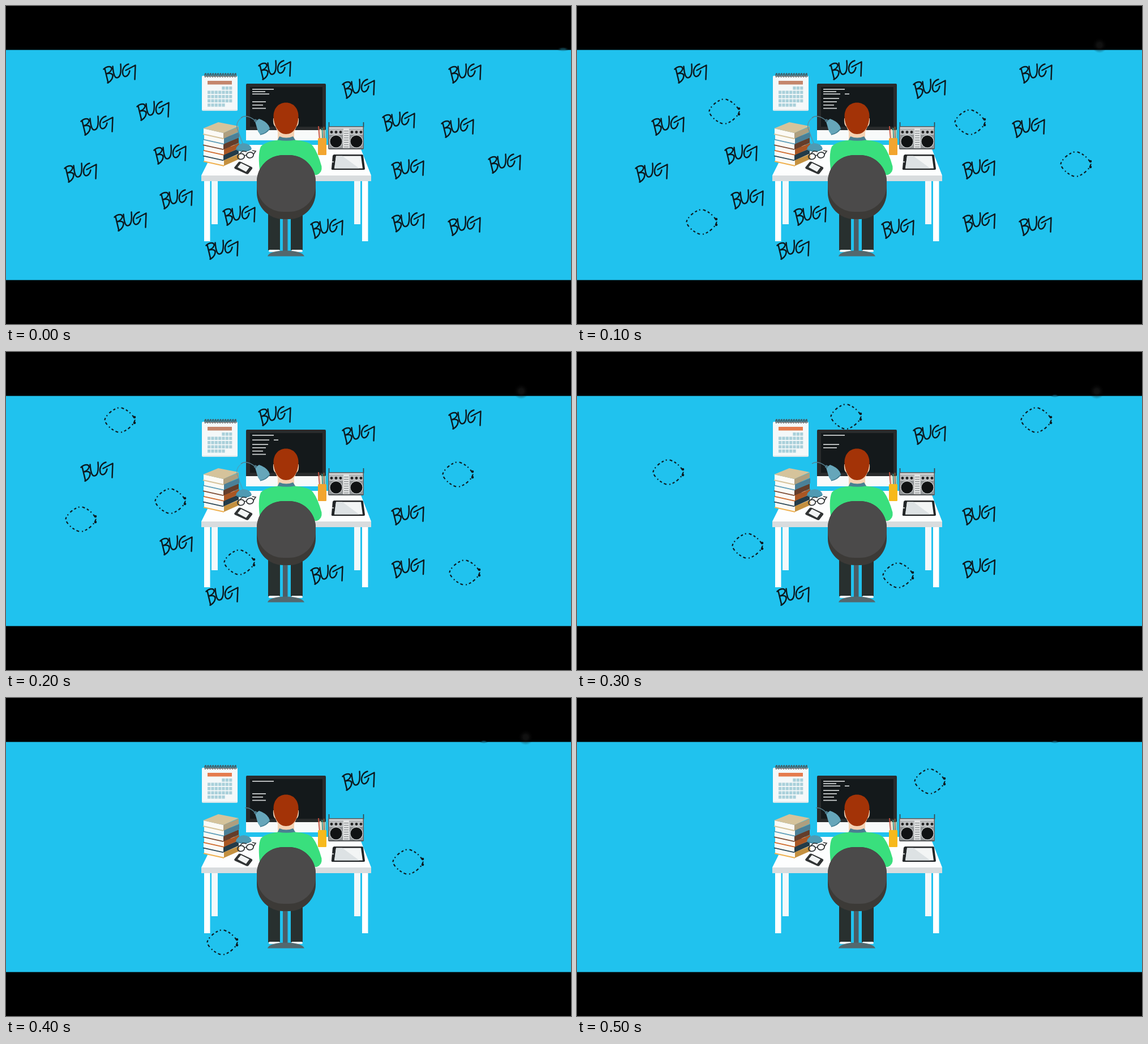
An HTML page with a canvas for the animation above (0.6 s loop, 998 px wide and 561 px high).

```html
<!DOCTYPE html>
<html lang="en">
<head>
<meta charset="utf-8">
<title>Bugs around the desk</title>
<style>
html, body { margin: 0; width: 100%; height: 100%; overflow: hidden; background: #000; }
canvas { display: block; width: 100vw; height: 100vh; }
</style>
</head>
<body>
<canvas id="stage" width="998" height="561"></canvas>
<script>
const ctx = document.getElementById('stage').getContext('2d');
const STEP = 100, STEPS = 6;
const SKY = '#20c2ee', INK = '#0c1a20';

// bug centres, grouped by the step in which they burst
const WAVES = {
  1: [[260, 185], [694, 204], [881, 278], [220, 380]],
  2: [[201, 119], [798, 215], [290, 262], [132, 294], [412, 370], [810, 388]],
  3: [[475, 113], [811, 119], [161, 211], [301, 341], [567, 393]],
  4: [[710, 288], [382, 430]],
  5: [[623, 146]]
};
// this one leaves without a burst
const QUIET = { x: 710, y: 381, end: 4 };

const BUG_PATH = new Path2D(
  'M-26 -8L-20 17M-28 -7C-22 -13 -13 -13 -14 -7C-15 -3 -20 0 -23 1C-16 -1 -11 1 -12 6C-13 12 -18 16 -21 17' +
  'M-12 -12C-11 0 -9 9 -4 8C2 7 3 -4 2 -16' +
  'M16 -16C8 -14 4 -6 6 2C8 9 16 6 18 -4M11 -5L28 -14L27 11');

function rect(color, x, y, w, h) {
  ctx.fillStyle = color;
  ctx.fillRect(x, y, w, h);
}
function round(color, x, y, w, h, r) {
  ctx.fillStyle = color;
  ctx.beginPath();
  ctx.roundRect(x, y, w, h, r);
  ctx.fill();
}
function oval(color, x, y, rx, ry = rx) {
  ctx.fillStyle = color;
  ctx.beginPath();
  ctx.ellipse(x, y, rx, ry, 0, 0, Math.PI * 2);
  ctx.fill();
}
function shape(color, d) {
  ctx.fillStyle = color;
  ctx.fill(new Path2D(d));
}
function line(color, width, d) {
  ctx.strokeStyle = color;
  ctx.lineWidth = width;
  ctx.stroke(typeof d === 'string' ? new Path2D(d) : d);
}
function at(x, y, paint) {
  ctx.save();
  ctx.translate(x, y);
  paint();
  ctx.restore();
}
function haze(color, x, y, rx, ry) {
  at(x, y, () => {
    ctx.scale(rx, ry);
    const g = ctx.createRadialGradient(0, 0, 0, 0, 0, 1);
    g.addColorStop(0.3, color);
    g.addColorStop(1, 'transparent');
    oval(g, 0, 0, 1);
  });
}

function calendar(accent) {
  round('#f4f8f9', 346, 123, 63, 62, 2);
  rect('#cfe0e4', 347, 183, 61, 1.5);
  for (let x = 352; x < 406; x += 4.4) line('#4a5054', 1.5, `M${x} 126Q${x - 2} 119 ${x + 1} 119L${x + 2} 125`);
  rect(accent, 356, 132, 43, 6.5);
  for (let row = 0; row < 5; row++)
    for (let col = row ? 0 : 4; col < (row === 4 ? 5 : 7); col++)
      rect('#a9d0da', 356 + col * 6.35, 142 + row * 7.5, 5.2, 5.6);
}

// the code on the screen is retyped line by line; each step leaves some rows out
function code(step) {
  const widths = [38, 23, 30, 28, 24, 19, 24];
  const missing = ['3', '', '1', '1256', '123', ''][step];
  widths.forEach((w, row) => {
    if (missing.includes(row)) return;
    const y = row < 3 ? 146 + row * 4.2 : 162.3 + (row - 3) * 5.8;
    rect('#d4d8d8', 435, y, w, 1.7);
    if (row === 2 && !missing.includes(3)) rect('#d4d8d8', 473, y, 8, 1.7);
  });
}

function monitor(step) {
  round('#292b2c', 424, 137, 141, 86, 2);
  rect('#14191b', 431, 143, 128, 70);
  rect('#f8fafa', 424, 219, 141, 18);
  code(step);
}

function desk() {
  for (const x of [363, 615]) rect('#f3f8fa', x, 309, 11, 76);
  for (const x of [350, 629]) rect('#fff', x, 309, 10.5, 106);
  shape('#fdfefe', 'M372 245H624L645 299H345Z');
  rect('#d8dcde', 345, 299, 300, 10);
}

function book(x, y, cover) {
  at(x, y, () => {
    shape('#fbfaf5', 'M1 0L36 8V18L1 10Z');
    shape(cover, 'M36 8L63 -3V6L36 18Z');
    shape('rgba(0,0,0,.18)', 'M36 8L63 -3V6L36 18Z');
    line(cover, 1.8, 'M0 10L36 18');
    shape(cover, 'M0 0L27 -11L63 -4L36 8Z');
  });
}
function books() {
  const covers = ['#efb04d', '#2b4858', '#cf6a2c', '#7b4b34', '#5c9db9', '#d5c39b'];
  covers.forEach((c, i) => book(349 + (i % 2 ? -1 : 0), 264 - i * 9.6, c));
}

function lamp(step) {
  if (step < 3) {
    ctx.globalAlpha = step < 2 ? 1 : 0.6;
    line('#5c93a6', 1.4, 'M419 245L408 215Q406 203 418 196');
    ctx.globalAlpha = 1;
  }
  line('#557f8e', 1.5, step < 4 ? 'M415 197Q425 190 440 202' : 'M422 194Q430 192 440 202');
  shape('#4f9ab3', 'M406 253Q408 243 420 242Q432 243 434 252Q430 257 420 257Q410 257 406 253Z');
  line('#3a7c92', 1, 'M407 253Q420 258 433 253');
  shape('#66a6ba', 'M440 204L447 199Q459 203 464 211L466 216Q460 225 449 227L445 221Z');
  line('#417d91', 1.5, 'M449 227Q460 225 466 216');
  oval('#4b7787', 440.5, 202, 2.6);
}

function gadgets() {
  for (const [x, y] of [[415, 265.5], [431, 263]]) {
    ctx.beginPath();
    ctx.ellipse(x, y, 6.2, 5, -0.15, 0, Math.PI * 2);
    ctx.strokeStyle = '#34383a';
    ctx.lineWidth = 1.8;
    ctx.stroke();
  }
  line('#34383a', 1.6, 'M421 264L425 263M409 264L418 256L425 257M437 262L441 256L435 255');
  shape('#303334', 'M403 285L411 275Q413 274 415 275L434 284Q436 285 435 287L428 296Q426 297 424 296L404 287Z');
  shape('#f2f4f4', 'M409 284.5L415 277L430 284.5L424 292.5Z');
  shape('#222527', 'M579 262H629Q631 262 631 264L634 287Q634 289 632 289H577Q574 289 575 286L577 264Z');
  shape('#f3f5f5', 'M583 264.5H627L630 286.5H580Z');
  shape('#dde2e4', 'M583 264.5H594L624 286.5H580Z');
  oval('#eee', 577.5, 275, 1.2);
}

function boombox() {
  line('#3c3f41', 1.6, 'M570.5 205V214M631.5 205V214');
  round('#54585a', 569, 212, 63, 41, 2);
  rect('#cfd1d2', 570.5, 213.5, 60, 37.5);
  rect('#9b9fa1', 571, 217, 59, 1.2);
  rect('#b9bcbe', 571, 219, 59, 7);
  for (const x of [583, 619]) {
    for (const knob of [-8, 0, 8]) oval('#222', x + knob, 222.5, 2.4);
    rect('#8f9395', x - 12, 227, 24, 24);
    oval('#c6c9ca', x, 239, 11.7);
    oval('#101213', x, 239, 10.5);
  }
  rect('#e2e4e4', 596, 216, 10, 34);
  for (let y = 220; y < 249; y += 4) rect('#85898b', 597, y, 8, 1.2);
}

function pencils(cup) {
  const colors = ['#c9503e', '#e9d7b0', '#3e8c78', '#8a5a36', '#5db3a4'];
  colors.forEach((c, i) => {
    const x = 553 + i * 2.7, top = 212 + (i * 5) % 7;
    line(c, 1.9, `M${x + 0.8} 234L${x - 1 + i * 0.5} ${top}`);
  });
  round(cup, 551, 233, 15, 30, 1.5);
}

function person() {
  for (const x of [463, 503]) {
    rect('#28302f', x, 360, 21, 71);
    round('#eef3f4', x + 1, 430, 20, 4, 2);
  }
  rect('#4d5c64', 489, 370, 8.5, 66);
  shape('#53686e', 'M462 441.5Q465 432 494 431.5Q523 432 527 441.5Z');

  shape('#f4d1b2', 'M480 215H509V236H480Z');
  shape('#4a7f92', 'M479 238L483 230Q495 235 507 230L512 238Z');
  shape('#39df7d', 'M449 296Q444 262 450 248Q458 239 481 236.5Q495 239 510 236.5Q534 238 542 247Q551 259 557.5 283Q559 294 549 298Z');
  shape('#f5d3b5', 'M472 198Q471 210 476 213L482 227H507L513 213Q518 210 517 198Z');
  shape('#a33307', 'M494.5 170.5C508 170.5 517 181 516.5 196C515.5 213 508 226 494.5 226C482 226 473.5 213 472.5 196C472 181 481 170.5 494.5 170.5Z');

  round('#3c3a37', 443, 263, 104, 113, 47);
  round('#4b4a4a', 443, 263, 104, 100, 47);
}

// dashed outline of a rounded diamond, with two blots on the right
function burst() {
  const ring = new Path2D(), bend = v => Math.sign(v) * Math.abs(v) ** 1.33;
  for (let a = 0; a < Math.PI * 2; a += 0.05) ring.lineTo(26.5 * bend(Math.cos(a)), 22 * bend(Math.sin(a)));
  ring.closePath();
  ctx.setLineDash([4, 4, 2, 5, 5, 4]);
  line(INK, 2.2, ring);
  for (const y of [-5, 5]) oval(INK, 26, y, 2.3);
}

function word() {
  ctx.lineCap = ctx.lineJoin = 'round';
  line(INK, 2.5, BUG_PATH);
}

function bugs(step) {
  for (const [wave, spots] of Object.entries(WAVES))
    for (const [x, y] of spots) {
      if (step < wave) at(x - 0.5, y - 0.5, word);
      else if (step === +wave) at(x, y + 1, burst);
    }
  if (step < QUIET.end) at(QUIET.x, QUIET.y, word);
}

function smudges(step) {
  if (step === 0) haze('rgba(30,110,130,.55)', 984, 76, 12, 4);
  if (step > 2) haze('rgba(20,100,125,.6)', 844, 77, 8, 3);
  if (step > 0 && step < 5) {
    const x = step === 1 ? 923 : step === 2 ? 910 : 918;
    haze('rgba(28,28,28,.6)', x, 69, 14, 14);
  }
}

function draw(step) {
  const late = step > 2;
  rect('#000', 0, 0, 998, 561);
  rect(SKY, 0, 77.5, 998, 406);
  smudges(step);
  calendar(late ? '#e57b4d' : '#c4866c');
  monitor(step);
  desk();
  books();
  lamp(step);
  gadgets();
  boombox();
  pencils(late ? '#f7b91c' : '#f2a52f');
  person();
  bugs(step);
}

function tick() {
  draw(Math.floor(performance.now() / STEP) % STEPS);
  requestAnimationFrame(tick);
}
tick();
</script>
</body>
</html>
```
